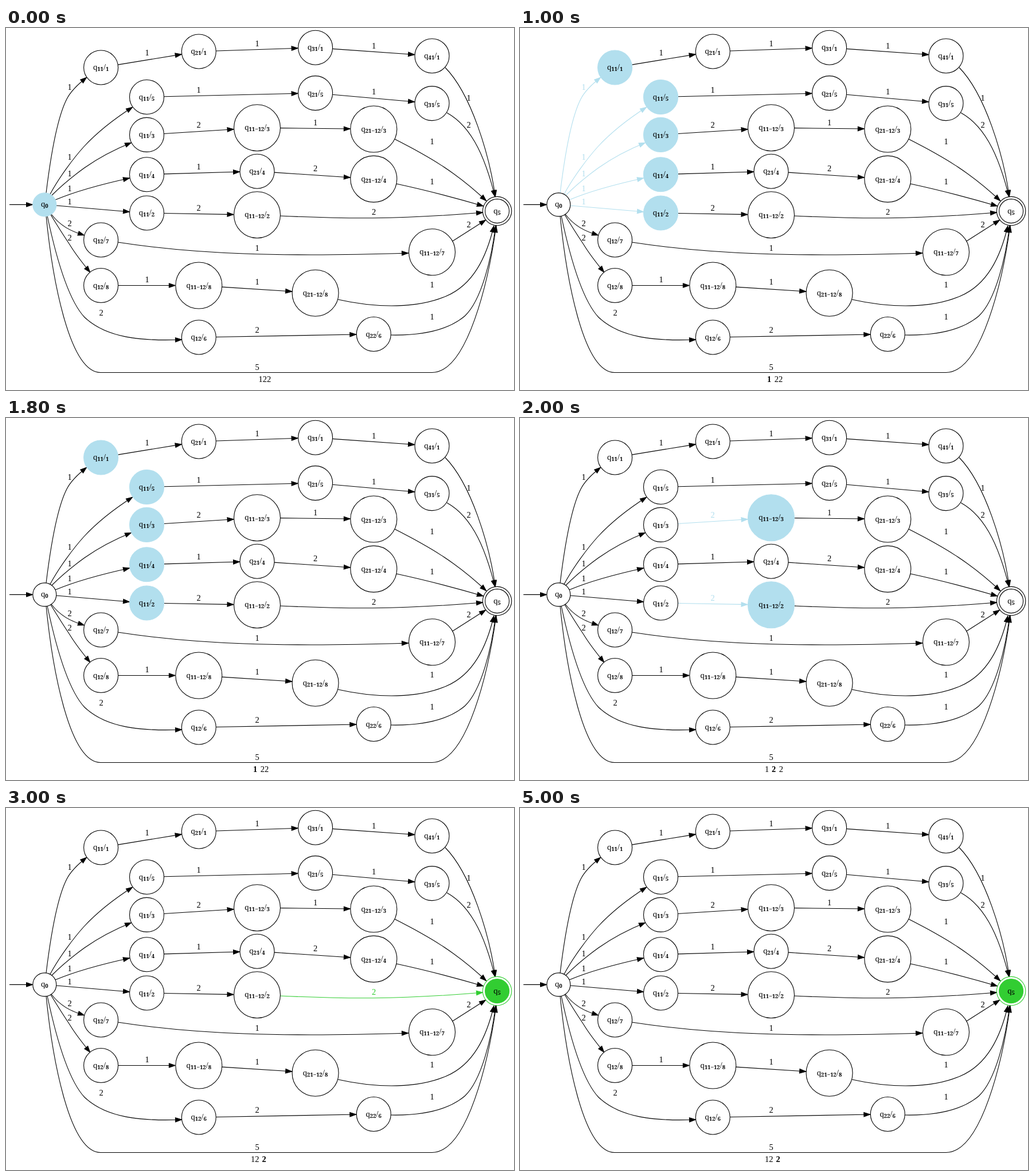
Animation, 886 px wide and 632 px high, one loop 6000 ms. Source, as an HTML page:

```html
<!DOCTYPE html>
<html lang="en">
<head>
<meta charset="utf-8">
<title>Automaton reading 122</title>
<style>
html, body { margin: 0; width: 100%; height: 100%; overflow: hidden; background: #fff; }
svg { display: block; width: 886px; height: 632px; }
text { font: 14.5px "Liberation Serif", Times, serif; text-anchor: middle; }
.sub { font: 600 9.6px "Noto Serif", serif; }
#caption { text-anchor: start; }
.bold { font-weight: bold; }
</style>
</head>
<body>
<svg id="stage" viewBox="0 0 886 632"></svg>
<script>
const BLUE = '#b2dfee', GREEN = '#32cd32', BLACK = '#000';
const SMALL = 30, LARGE = 40.5;
const stage = document.getElementById('stage');

function add(tag, attrs, parent = stage, content = '') {
  const el = document.createElementNS('http://www.w3.org/2000/svg', tag);
  for (const key in attrs) el.setAttribute(key, attrs[key]);
  el.textContent = content;
  return parent.appendChild(el);
}

// name: x, y, radius
const nodes = {
  '0': [67.3, 308.4, 20.5], '5': [856.6, 319.6, 21],
  '11/1': [165.6, 69, SMALL], '21/1': [336.3, 41, SMALL], '31/1': [539.6, 34.2, SMALL], '41/1': [743, 48.7, SMALL],
  '11/5': [245.5, 120.5, SMALL], '21/5': [539.6, 113.6, SMALL], '31/5': [743, 131.6, SMALL],
  '11/3': [245.5, 186.4, SMALL], '11_12/3': [438, 174.2, LARGE], '21_12/3': [641.3, 176.5, LARGE],
  '11/4': [245.5, 255.7, SMALL], '21/4': [438, 250.2, SMALL], '21_12/4': [641.3, 263.6, LARGE],
  '11/2': [245.5, 323, SMALL], '11_12/2': [438, 326.3, LARGE],
  '12/7': [165.6, 370, SMALL], '11_12/7': [743, 391.3, LARGE],
  '12/8': [165.6, 449.5, SMALL], '11_12/8': [336.3, 449.5, LARGE], '21_12/8': [539.6, 462.7, LARGE],
  '12/6': [336.3, 540, SMALL], '22/6': [641.3, 534.5, SMALL]
};

// from>to, label, label centre, optional curve
const outgoing = [
  ['0>11/1', 1, 111, 103, 'M70 288C76 239 88 159 106 124C113 110 127 97 141 86'],
  ['0>11/5', 1, 111, 225, 'M77 290C92 262 117 228 136 207C160 181 193 156 221 138'],
  ['0>11/3', 1, 111, 254, 'M80 292C96 276 119 257 137 244C161 227 192 211 219 200'],
  ['0>11/4', 1, 111, 280, 'M86 300C122 285 170 272 216 262'],
  ['0>11/2', 1, 111, 303, 'M88 310L216 321'],
  ['0>12/7', 2, 111, 341, 'M79 325C94 345 113 355 137 362'],
  ['0>12/8', 2, 111, 366, 'M78 326C90 346 101 363 111 378C120 393 134 411 147 427'],
  ['0>12/6', 2, 166, 497, 'M72 328C83 380 104 470 137 505C175 541 235 547 307 544'],
  ['0>5', 5, 438, 592, 'M70 328C80 430 109 601.5 165 601.5H743C805 601.5 842 440 855 345']
];
const chains = [
  ['11/1>21/1', 1, 246, 43], ['21/1>31/1', 1, 438, 27], ['31/1>41/1', 1, 641.5, 31],
  ['11/5>21/5', 1, 336, 108], ['21/5>31/5', 1, 641.5, 111],
  ['11/3>11_12/3', 2, 336, 169], ['11_12/3>21_12/3', 1, 539.5, 165],
  ['11/4>21/4', 1, 336, 242], ['21/4>21_12/4', 2, 539.5, 245],
  ['11/2>11_12/2', 2, 336, 314],
  ['12/7>11_12/7', 1, 438, 384, 'M195 374C330 395 480 400 702 393'],
  ['12/8>11_12/8', 1, 246, 439], ['11_12/8>21_12/8', 1, 438, 443],
  ['12/6>22/6', 2, 438, 527]
];
const incoming = [
  ['41/1>5', 1, 807, 122, 'M766 69C811 115 843 220 853.5 295'],
  ['31/5>5', 2, 807, 169, 'M769 148C816 174 838 235 853 295'],
  ['21_12/3>5', 1, 743, 198, 'M678 194C737 224 784 251 838 302'],
  ['21_12/4>5', 1, 743, 268, 'M681 272C732 283 785 297 833 311'],
  ['11_12/2>5', 2, 641.5, 321, 'M478 328C590 333 680 335 832 322'],
  ['11_12/7>5', 2, 807, 343, 'M779 372L837 335'],
  ['21_12/8>5', 1, 743, 448, 'M579 474C650 490 720 489 768 468C815 448 838 400 851 345'],
  ['22/6>5', 1, 743, 504, 'M671 536C720 537 768 530 800 503C830 475 847 400 854 345']
];

function straight(from, to) {
  const [x1, y1, r1] = nodes[from], [x2, y2, r2] = nodes[to];
  const length = Math.hypot(x2 - x1, y2 - y1);
  const dx = (x2 - x1) / length, dy = (y2 - y1) / length;
  return `M${x1 + dx * r1} ${y1 + dy * r1}L${x2 - dx * r2} ${y2 - dy * r2}`;
}

function drawArrow(d, parent) {
  const line = add('path', { d, fill: 'none', 'stroke-width': 1.1 }, parent);
  const length = line.getTotalLength();
  const tip = line.getPointAtLength(length), base = line.getPointAtLength(length - 11);
  const angle = Math.atan2(tip.y - base.y, tip.x - base.x) * 180 / Math.PI;
  add('path', { d: 'M-.5 0L-11.5 -3.8V3.8Z', transform: `translate(${tip.x} ${tip.y}) rotate(${angle})` }, parent);
}

function drawEdge([name, label, x, y, curve]) {
  const group = add('g');
  drawArrow(curve || straight(...name.split('>')), group);
  add('text', { x, y: y + 5, stroke: 'none' }, group, label);
  return [name, group];
}

function drawNode(name) {
  const [x, y, r] = nodes[name];
  const group = add('g', { 'stroke-width': 1.1 });
  if (name === '5') add('circle', { cx: x, cy: y, r: 25.2, fill: '#fff' }, group);
  const disc = add('circle', { cx: x, cy: y, r }, group);
  const text = add('text', { x, y: y + 4, stroke: 'none' }, group);
  add('tspan', {}, text, 'q');
  const [state, branch] = name.split('/');
  add('tspan', { class: 'sub', dy: 2 }, text, state.replace('_', '−'));
  if (branch) {
    add('tspan', { dy: -2 }, text, '/');
    add('tspan', { class: 'sub', dy: 2 }, text, branch);
  }
  return [name, { group, disc }];
}

const start = add('g', { fill: BLACK, stroke: BLACK });
drawArrow('M6 308.4H47', start);
const edgeViews = [...outgoing, ...chains, ...incoming].map(drawEdge);
const nodeViews = Object.keys(nodes).map(drawNode);
const caption = add('text', { id: 'caption' });

const firstStates = ['11/1', '11/5', '11/3', '11/4', '11/2'];
const secondStates = ['11_12/3', '11_12/2'];
const firstEdges = firstStates.map(name => '0>' + name);
const secondEdges = ['11/3>11_12/3', '11/2>11_12/2'];

// Caption parts are [x, digits, bold].
const unread = [[440.5, '122']];
const readOne = [[431, '1', true], [443.7, '22']];
const readTwo = [[427, '1'], [439, '2', true], [451.8, '2']];
const readAll = [[427, '12'], [446.6, '2', true]];
const phases = [
  { at: 0, color: BLUE, states: ['0'], edges: [], input: unread },
  { at: 1000, color: BLUE, states: firstStates, edges: firstEdges, input: readOne },
  { at: 1500, color: BLUE, states: firstStates, edges: [], input: readOne },
  { at: 2000, color: BLUE, states: secondStates, edges: secondEdges, input: readTwo },
  { at: 2500, color: BLUE, states: secondStates, edges: [], input: readTwo },
  { at: 3000, color: GREEN, states: ['5'], edges: ['11_12/2>5'], input: readAll },
  { at: 3500, color: GREEN, states: ['5'], edges: [], input: readAll }
];

function show({ color, states, edges, input }) {
  for (const [name, group] of edgeViews) {
    const paint = edges.includes(name) ? color : BLACK;
    group.setAttribute('stroke', paint);
    group.setAttribute('fill', paint);
  }
  for (const [name, { group, disc }] of nodeViews) {
    const active = states.includes(name);
    group.setAttribute('stroke', active ? color : BLACK);
    disc.setAttribute('fill', active ? color : '#fff');
  }
  caption.replaceChildren();
  for (const [x, digits, bold] of input) {
    add('tspan', { x, y: 618, class: bold ? 'bold' : '' }, caption, digits);
  }
}

let current;
const origin = performance.now();
function tick() {
  const time = (performance.now() - origin) % 6000;
  const phase = phases.findLast(p => p.at <= time);
  if (phase !== current) show(current = phase);
  requestAnimationFrame(tick);
}
tick();
</script>
</body>
</html>
```
